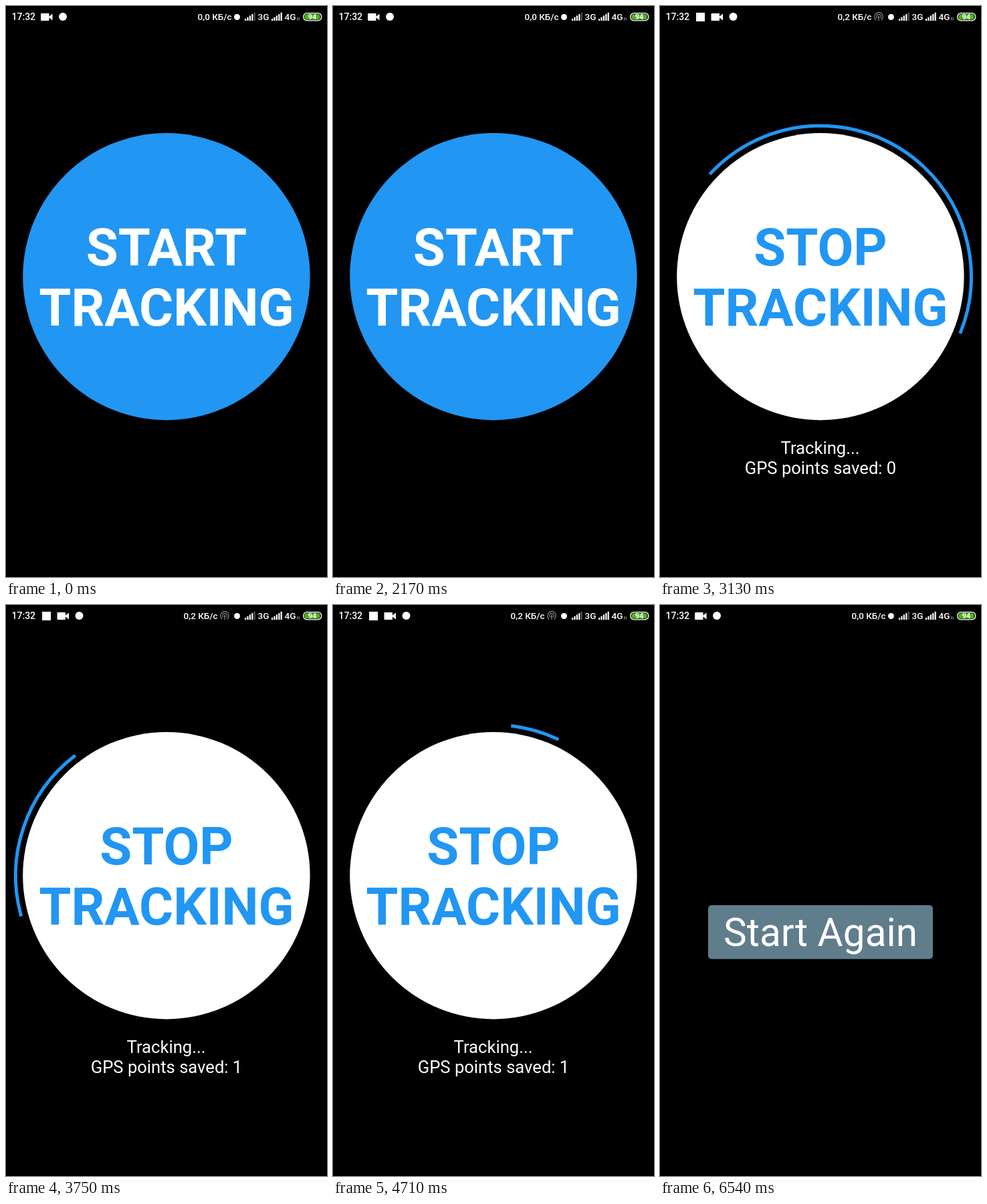
An HTML page with a canvas that plays this animation: 480 by 854 pixels, repeating every 6580 ms.

```html
<!DOCTYPE html>
<html lang="en">
<head>
<meta charset="utf-8">
<title>Tracking button</title>
<style>
  html, body { margin: 0; width: 100%; height: 100%; overflow: hidden; background: #000; }
  canvas { display: block; }
</style>
</head>
<body>
<canvas id="stage" width="480" height="854"></canvas>
<script>
const ctx = document.getElementById('stage').getContext('2d');
const LOOP = 6580, FPS = 24;
const TRACK_START = 2247, ICONS_AT = 2750, POINT_AT = 3330, TRACK_END = 6000;
const WHITE = '#fff', BLUE = '#2196f3', SLATE = '#607d8b', DIM = '#8c8c8c';
const CENTER = { x: 239.9, y: 404.7 };

function text(str, x, y, size, { weight = 400, color = WHITE, align = 'center' } = {}) {
  ctx.font = `${weight} ${size}px Roboto, sans-serif`;
  ctx.textAlign = align;
  ctx.fillStyle = color;
  ctx.fillText(str, x, y);
}

function disc(x, y, r, color) {
  ctx.fillStyle = color;
  ctx.beginPath();
  ctx.arc(x, y, r, 0, Math.PI * 2);
  ctx.fill();
}

function box(x, y, w, h, r, color) {
  ctx.fillStyle = color;
  ctx.beginPath();
  ctx.roundRect(x, y, w, h, r);
  ctx.fill();
}

function arc(x, y, r, from, to, width, color, cap = 'butt') {
  ctx.strokeStyle = color;
  ctx.lineWidth = width;
  ctx.lineCap = cap;
  ctx.beginPath();
  ctx.arc(x, y, r, from * Math.PI / 180, to * Math.PI / 180);
  ctx.stroke();
}

// Cubic bezier easing (0.4, 0, 0.2, 1), solved by bisection.
function ease(u) {
  if (u <= 0) return 0;
  if (u >= 1) return 1;
  let lo = 0, hi = 1, s = 0.5;
  for (let i = 0; i < 24; i++) {
    s = (lo + hi) / 2;
    const x = 1.2 * (1 - s) * (1 - s) * s + 0.6 * (1 - s) * s * s + s * s * s;
    if (x < u) lo = s; else hi = s;
  }
  return s * s * (3 - 2 * s);
}

function spinner(time) {
  const drift = Math.max(0, time - 4710) * 0.0635;
  const t = Math.max(0, time - TRACK_START - drift);
  const cycle = t / 1333 % 1;
  const head = 270 * ease(cycle * 2);
  const tail = 270 * ease(cycle * 2 - 1);
  const start = -90 + tail + 90 * cycle + 360 * (t / 2222 % 1);
  arc(CENTER.x, CENTER.y, 225.5, start, start + Math.max(head - tail, 0.1), 5, BLUE, 'square');
}

function roundButton(word, fill, ink) {
  disc(CENTER.x, CENTER.y, 214.7, fill);
  text(word, 240, 388, 78, { weight: 700, color: ink });
  text('TRACKING', 240, 478, 78, { weight: 700, color: ink });
}

function camera(x) {
  box(x, 11, 12.5, 11, 1.2, WHITE);
  ctx.beginPath();
  ctx.moveTo(x + 11.5, 16.5);
  ctx.lineTo(x + 17.5, 11.5);
  ctx.lineTo(x + 17.5, 21.5);
  ctx.fill();
}

function signal(x, lit) {
  for (let i = 0; i < 5; i++) {
    const h = 3 + i * 2.3;
    box(x + i * 3.4, 22 - h, 2.2, h, 0, i < lit ? WHITE : '#555');
  }
}

function locationIcon() {
  arc(327, 16, 6.3, 125, 415, 1.2, DIM);
  arc(327, 16, 3.4, 135, 405, 1.1, DIM);
  disc(327, 16.5, 1.3, DIM);
  box(326.4, 17, 1.2, 5, 0, DIM);
}

function battery() {
  box(444, 10, 28.5, 12.5, 6, WHITE);
  box(445.3, 11.3, 25.9, 9.9, 5, '#16300c');
  box(446.5, 12.2, 23, 8.1, 4, '#4fb51c');
  text('94', 458, 20.2, 11, { weight: 700 });
}

function statusBar(tracking, icons) {
  const left = { weight: 500, align: 'left' };
  const shift = icons ? 24.5 : 0;
  text('17:32', 8.5, 21, 14, left);
  if (icons) {
    box(54, 10, 13, 13, 0, WHITE);
    locationIcon();
  }
  camera(52 + shift);
  disc(85 + shift, 16, 6, WHITE);
  text(tracking ? '0,2 КБ/с' : '0,0 КБ/с', icons ? 316.5 : 337.5, 21, 13.4, { weight: 500, align: 'right' });
  disc(345.5, 16.5, 4.5, WHITE);
  signal(357, 4);
  text('3G', 376.5, 21, 13.6, left);
  signal(397, 5);
  text('4G', 416.5, 21, 13.6, left);
  box(435, 17, 1.2, 4.5, 0, DIM);
  box(437.6, 17, 1.2, 4.5, 0, DIM);
  battery();
}

function draw(now) {
  const loopTime = now % LOOP;
  const time = Math.floor((loopTime + 4.5) * FPS / 1000) * 1000 / FPS;
  const ended = time >= TRACK_END;
  const tracking = time >= TRACK_START && !ended;

  ctx.fillStyle = '#000';
  ctx.fillRect(0, 0, 480, 854);
  statusBar(tracking, tracking && time >= ICONS_AT);

  if (ended) {
    box(72, 449, 336, 80.5, 5, SLATE);
    text('Start Again', 240, 509.5, 58.5);
  } else if (tracking) {
    roundButton('STOP', WHITE, BLUE);
    spinner(time);
    text('Tracking...', 239.5, 670, 25.6);
    text('GPS points saved: ' + (time >= POINT_AT ? 1 : 0), 240, 700, 25.6);
  } else {
    roundButton('START', BLUE, WHITE);
  }
}

function tick() {
  draw(performance.now());
  requestAnimationFrame(tick);
}
tick();
</script>
</body>
</html>
```
